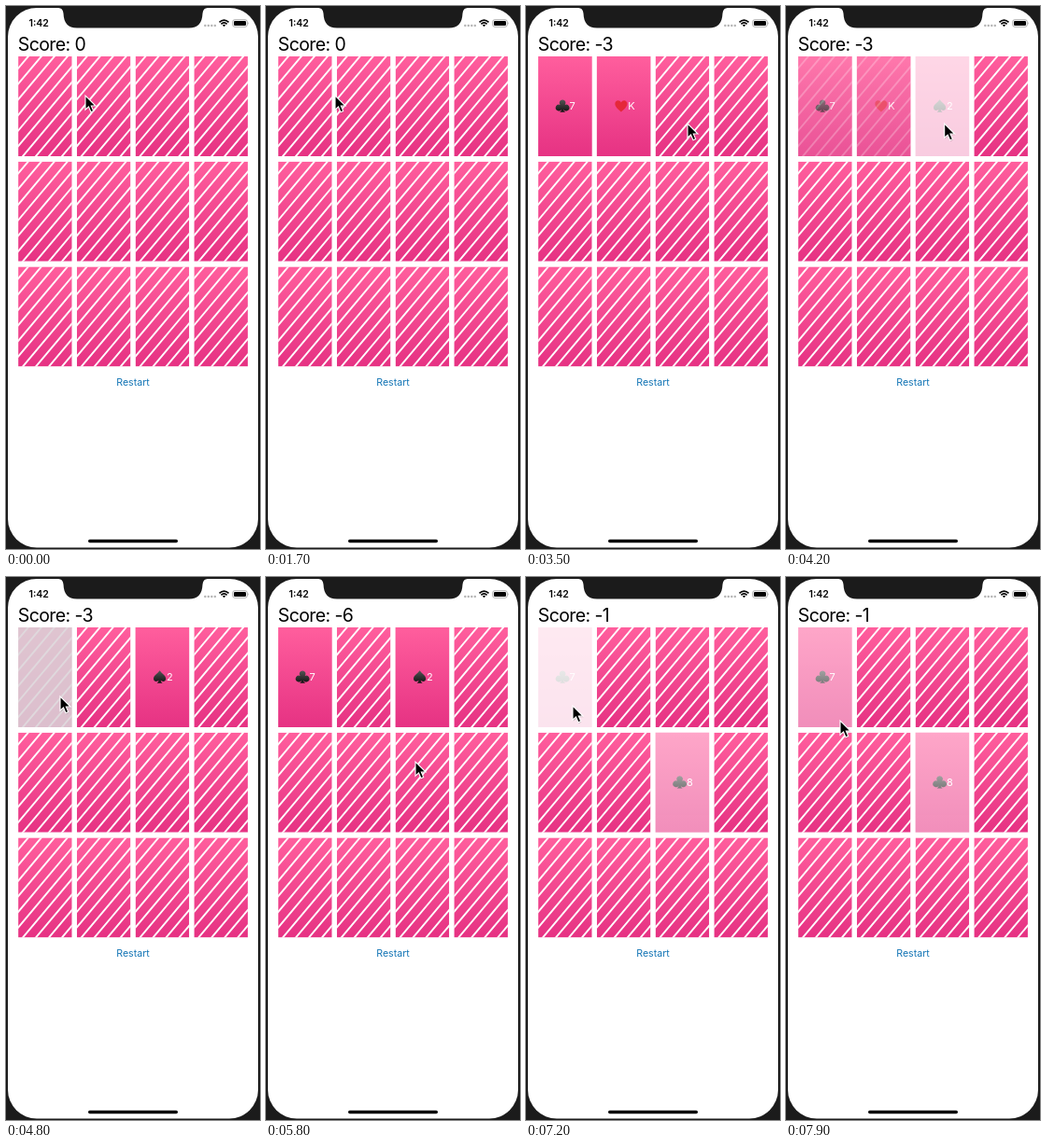
Recreate the animation shown at these times as an HTML page. Size 272 by 582 pixels, loop 8000 ms.

```html
<!DOCTYPE html>
<html lang="en">
<head>
<meta charset="utf-8">
<title>Card matching</title>
<style>
  html, body { margin: 0; width: 100%; height: 100%; overflow: hidden; background: #1b1b1b; }
  svg { display: block; width: 272px; height: 582px; font-family: Inter, Roboto, sans-serif; }
</style>
</head>
<body>
<svg viewBox="0 0 272 582">
  <defs>
    <linearGradient id="pink" x2="0" y2="1">
      <stop stop-color="#ff5e9d"/><stop offset="1" stop-color="#e63283"/>
    </linearGradient>
    <linearGradient id="ink" x2="0" y2="1">
      <stop stop-color="#555"/><stop offset="1" stop-color="#111"/>
    </linearGradient>
    <clipPath id="cardClip"><rect width="57.6" height="107"/></clipPath>
    <g id="back" clip-path="url(#cardClip)">
      <rect width="57.6" height="107" fill="url(#pink)"/>
      <path id="stripes" transform="translate(28.8 53.5) rotate(40)" stroke="#fff" stroke-width="1.900"/>
    </g>
    <g id="club" fill="url(#ink)">
      <path d="M0 -6.8A3.3 3.3 0 0 1 2.6 -1.4A3.4 3.4 0 1 1 1 3.4Q1.2 5.4 3 6.5H-3Q-1.2 5.4 -1 3.4A3.4 3.4 0 1 1 -2.6 -1.4A3.3 3.3 0 0 1 0 -6.8Z"/>
    </g>
    <g id="spade" fill="url(#ink)">
      <path d="M0 -7C2 -4 6.6 -1.7 6.6 1.6C6.6 5 2.7 5.6 1 3.2Q1.2 5.4 3 6.5H-3Q-1.2 5.4 -1 3.2C-2.7 5.6 -6.6 5 -6.6 1.6C-6.6 -1.7 -2 -4 0 -7Z"/>
    </g>
    <g id="heart" fill="#e5283a">
      <path d="M0 6.3C-3 3.5 -6.5 0.8 -6.5 -2.6C-6.5 -6.6 -1.6 -7.4 0 -3.9C1.6 -7.4 6.5 -6.6 6.5 -2.6C6.5 0.8 3 3.5 0 6.3Z"/>
    </g>
  </defs>

  <rect width="272" height="582" fill="#1b1b1b"/>
  <rect x="2" y="2" width="268" height="578.5" rx="31" fill="#fff"/>
  <path d="M56 0V2Q61 2 61.5 8C62 18 66 23.500 76 23.500H196C206 23.500 210 18 210.500 8Q211 2 216 2V0Z" fill="#1b1b1b"/>
  <text x="24.500" y="22" font-size="10.500" font-weight="600">1:42</text>
  <g fill="#b5b5b5">
    <circle cx="213.300" cy="21" r="1.200"/><circle cx="216.800" cy="21" r="1.200"/>
    <circle cx="220.300" cy="21" r="1.200"/><circle cx="223.800" cy="21" r="1.200"/>
  </g>
  <g fill="none" stroke="#000" stroke-width="1.700">
    <path d="M228.500 17.300Q233.500 12.800 238.500 17.300M230.400 19.300Q233.500 16.500 236.600 19.300"/>
    <path d="M231.900 20.400Q233.500 19 235.100 20.400L233.500 22.200Z" fill="#000" stroke="none"/>
  </g>
  <rect x="242.700" y="14.700" width="15.600" height="7.600" rx="2.200" fill="none" stroke="#999" stroke-width=".8"/>
  <rect x="244" y="16" width="13" height="5" rx="1.200"/>
  <path d="M259.300 17Q260.600 18.500 259.300 20Z" fill="#999"/>

  <text id="score" x="12.800" y="48" font-size="19.500" letter-spacing="-.6"></text>
  <g id="cards"></g>
  <text x="136" y="406.700" font-size="10.600" text-anchor="middle" fill="#1274b5">Restart</text>
  <rect x="88" y="571.800" width="96" height="3.500" rx="1.750"/>
  <g id="cursor">
    <path d="M0 0V15.200L3.500 12L6 17.800L8.700 16.600L6.300 11H11Z" fill="#000" opacity=".2" transform="translate(.6 1.2)"/>
    <path d="M0 0V15.200L3.500 12L6 17.800L8.700 16.600L6.300 11H11Z" stroke="#fff" stroke-width="1.100"/>
  </g>
</svg>
<script>
const LOOP = 8000, PRESS = 80, RELEASE = 150, DIM = 0.55;
const $ = id => document.getElementById(id);
const clamp = v => Math.max(0, Math.min(1, v));

// Evenly spaced bars, symmetric about the card centre before rotation
const W = 57.6, H = 107, GAP = 10.72;
let bars = '';
for (let k = -5.5; k <= 5.5; k++) bars += `M${k * GAP} -${H}V${H}`;
$('stripes').setAttribute('d', bars);

// Card faces and what happens to them, by grid position
const deck = {
  0: { suit: 'club', rank: '7', events: [[1950, 'up', 1], [4150, 'down'], [4700, 'up', 1], [6100, 'down'], [7035, 'up', DIM]] },
  1: { suit: 'heart', rank: 'K', events: [[2700, 'up', 1], [4150, 'down']] },
  2: { suit: 'spade', rank: '2', events: [[4000, 'up', 1], [6100, 'down']] },
  6: { suit: 'club', rank: '8', events: [[5950, 'up', 1], [7185, 'dim']] }
};
const scores = [[0, 0], [2850, -3], [4850, -6], [7185, -1]];
const pointer = [
  [0, 85, 96], [900, 85, 96], [1100, 74, 96], [1700, 74, 96], [1950, 61, 112], [2350, 61, 112],
  [2650, 106, 113], [2900, 106, 113], [3400, 173, 126], [4150, 173, 126], [4650, 58, 128],
  [5400, 58, 128], [5800, 160, 198], [6350, 162, 202], [6950, 50, 138], [7250, 50, 138],
  [7700, 58, 154], [LOOP, 58, 154]
];

const cards = [];
for (let i = 0; i < 12; i++) {
  const x = 13.1 + (i % 4) * 62.75, y = 54 + Math.floor(i / 4) * 112.7;
  const { suit, rank, events } = deck[i] || {};
  const face = suit ? `
    <rect class="press" width="${W}" height="${H}" fill="#dbd3d8" opacity="0"/>
    <g class="face" opacity="0">
      <rect width="${W}" height="${H}" fill="url(#pink)"/>
      <use href="#${suit}" x="26" y="53.3"/>
      <text x="33.3" y="57.4" font-size="11" fill="#fff">${rank}</text>
    </g>` : '';
  $('cards').insertAdjacentHTML('beforeend',
    `<g transform="translate(${x} ${y})">${face}<use class="back" href="#back"/></g>`);
  if (suit) {
    const node = $('cards').lastElementChild;
    cards.push({ events, parts: ['back', 'press', 'face'].map(c => node.querySelector('.' + c)) });
  }
}

const latest = (list, t) => list.filter(e => e[0] <= t).pop();

// Opacities of back, press tint and face
function cardLook(events, t) {
  const event = latest(events, t);
  if (!event) return [1, 0, 0];
  const [start, kind, level] = event, d = t - start;
  if (kind === 'dim') return [0, 0, DIM];
  if (kind === 'down') {
    const p = clamp(d / 250);
    return [p, 0, 1 - p];
  }
  if (d < RELEASE) {
    const p = clamp(d / PRESS);
    return [1 - 0.88 * p, p, 0];
  }
  return [0, 0, 0.11 + (level - 0.11) * clamp((d - RELEASE) / 330)];
}

function pointerAt(t) {
  const i = pointer.findIndex(p => p[0] > t);
  const [t0, x0, y0] = pointer[i - 1], [t1, x1, y1] = pointer[i];
  const p = (t - t0) / (t1 - t0), e = p * p * (3 - 2 * p);
  return [x0 + (x1 - x0) * e, y0 + (y1 - y0) * e];
}

function render(t) {
  $('score').textContent = 'Score: ' + latest(scores, t)[1];
  for (const { events, parts } of cards) {
    cardLook(events, t).forEach((opacity, i) => parts[i].setAttribute('opacity', opacity));
  }
  $('cursor').setAttribute('transform', `translate(${pointerAt(t)})`);
}

const began = performance.now();
function tick() {
  render((performance.now() - began) % LOOP);
  requestAnimationFrame(tick);
}
tick();
</script>
</body>
</html>
```
